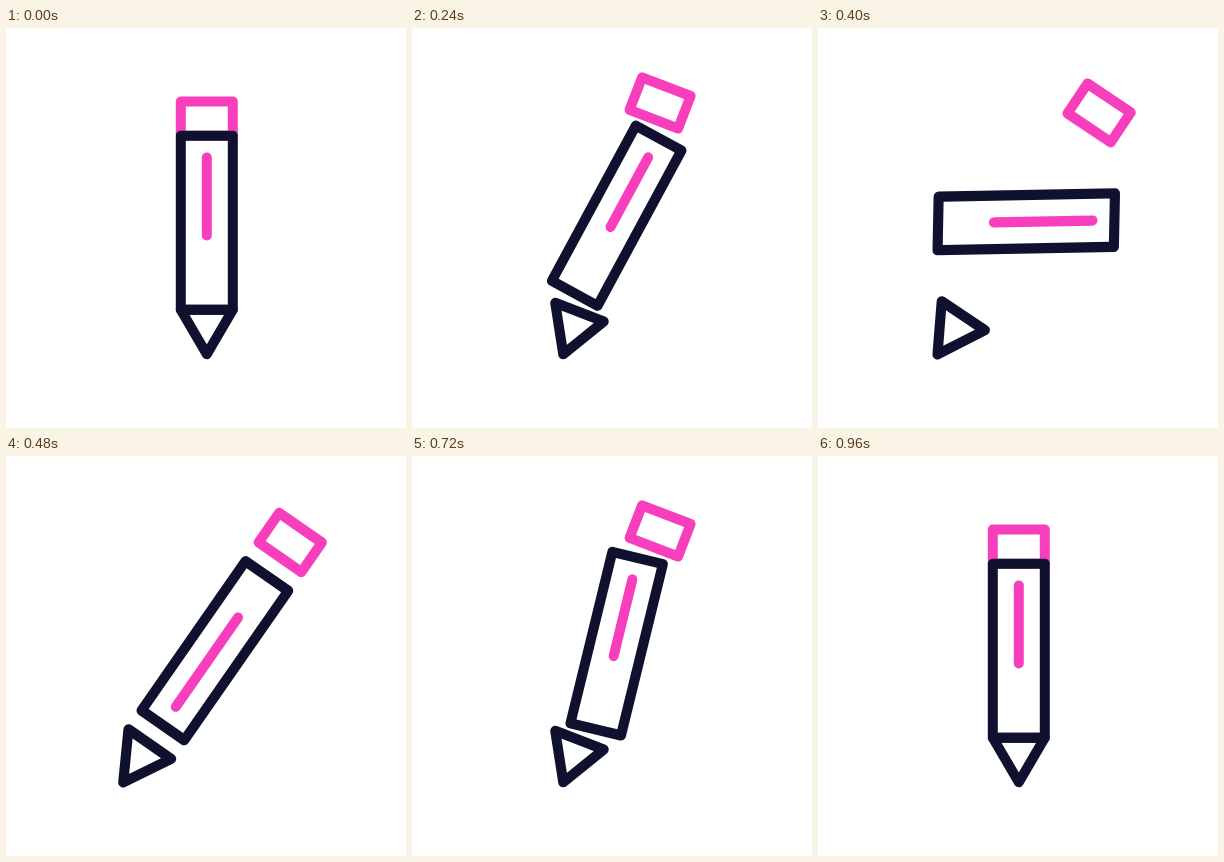
An HTML page for the animation above (1.04 s loop, 400 px wide and 400 px high).

```html
<!DOCTYPE html>
<html lang="en">
<head>
<meta charset="utf-8">
<title>Pencil</title>
<style>
  html, body { margin: 0; width: 100%; height: 100%; overflow: hidden; background: #fff; }
  svg { display: block; width: 100%; height: 100%; }
  path { fill: none; stroke-width: 10; stroke-linecap: round; stroke-linejoin: round; }
  .ink { stroke: #10112f; }
  .pink { stroke: #f73fbd; }
</style>
</head>
<body>
<svg viewBox="0 0 400 400">
  <g id="pencil">
    <path id="eraser" class="pink" d="M-26-121.3H26V-87H-26Z"/>
    <path id="tip" class="ink" d="M-26 87H26L0 131.5Z"/>
    <g id="body">
      <path class="ink" d="M-26-87H26V87H-26Z"/>
      <path id="stripe" class="pink"/>
    </g>
  </g>
</svg>
<script>
const LOOP = 1040, STEP = 40, END = 960, MID = END / 2, WINDUP = 160;
const FLOOR = 326.3, APEX = 131.5;
const [pencil, eraser, tip, body, stripe] =
  ['pencil', 'eraser', 'tip', 'body', 'stripe'].map(id => document.getElementById(id));

const mix = (a, b, k) => a + (b - a) * k;
const span = (t, a, b) => Math.min(1, Math.max(0, (t - a) / (b - a)));
const smooth = k => k * k * (3 - 2 * k);

function bezier(x1, y1, x2, y2) {
  const at = (a, b, u) => 3 * a * u * (1 - u) ** 2 + 3 * b * u * u * (1 - u) + u ** 3;
  return x => {
    let lo = 0, hi = 1;
    for (let i = 0; i < 30; i++) {
      const u = (lo + hi) / 2;
      if (at(x1, x2, u) < x) lo = u; else hi = u;
    }
    return at(y1, y2, hi);
  };
}
const burst = bezier(0.05, 0.5, 0.3, 1);
const whirl = bezier(0.85, 0, 0.15, 1);

function draw(t) {
  // The whole pencil plays forward to the middle and then back; only the spin runs on.
  const m = MID - Math.abs(t - MID);
  const wind = smooth(span(m, 0, WINDUP));
  const open = m > WINDUP ? burst(span(m, WINDUP, MID)) : 0;

  const tilt = mix(-8.2 * wind, 34.85, open);
  const stretch = mix(1 - 0.051 * wind, 1.045, open);
  const spread = 22 * open;
  const x = mix(mix(200.8, 204.2, wind), 208.9, open ** 6);
  // The point stays on the floor line.
  const y = FLOOR - stretch * (APEX + spread) * Math.cos(tilt * Math.PI / 180);
  const spin = 360 * whirl(span(t, 98, 862));
  const low = 12.6 + 26 * smooth(span(m, 240, MID));

  pencil.setAttribute('transform', `translate(${x} ${y}) rotate(${tilt}) scale(1 ${stretch})`);
  eraser.setAttribute('transform', `translate(0 ${-spread})`);
  tip.setAttribute('transform', `translate(0 ${spread})`);
  body.setAttribute('transform', `rotate(${spin})`);
  stripe.setAttribute('d', `M0-65.3V${low}`);
}

const start = performance.now();
function tick() {
  const t = (performance.now() - start) % LOOP;
  draw(Math.min(END, Math.floor(t / STEP) * STEP));
  requestAnimationFrame(tick);
}
tick();
</script>
</body>
</html>
```
